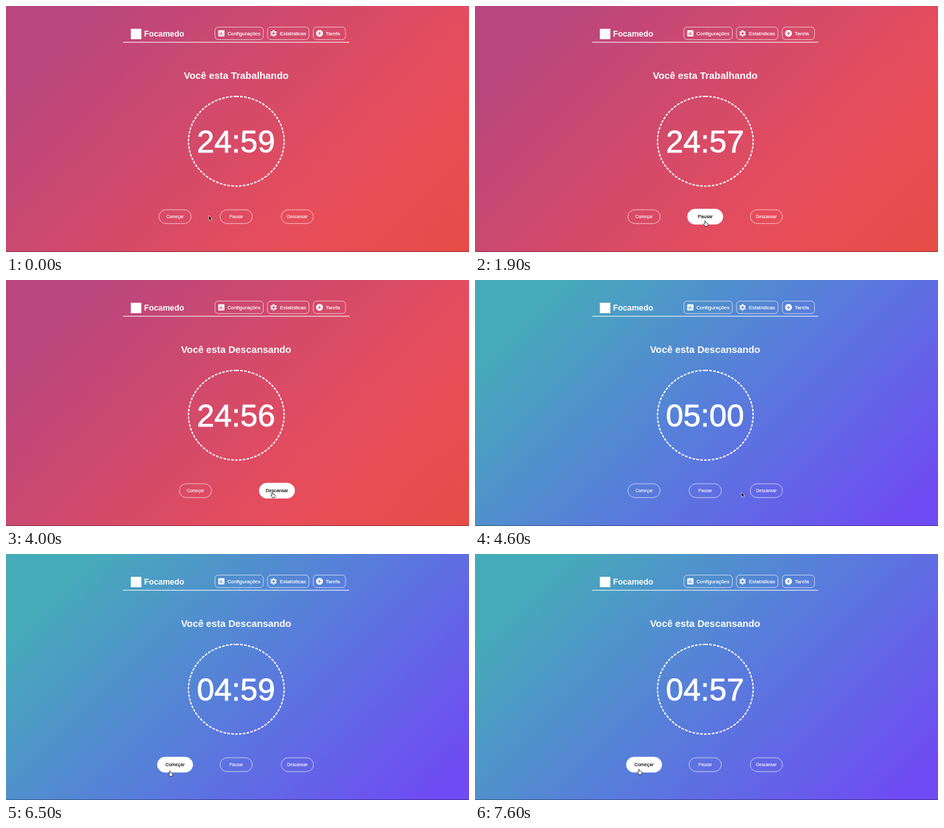
An HTML page that plays this animation: 710 by 378 pixels, repeating every 8 s.

```html
<!DOCTYPE html>
<html lang="pt">
<head>
<meta charset="utf-8">
<title>Focamedo</title>
<style>
  html, body { margin: 0; width: 100%; height: 100%; overflow: hidden; }
  svg { display: block; width: 100vw; height: 100vh; }
  text { font-family: "Liberation Sans", Arial, sans-serif; fill: #fff; }
  .bold { font-weight: bold; }
  .nav text { font-size: 7.89px; stroke: #fff; stroke-width: .18; }
  .outline { fill: none; stroke: #fff; stroke-width: .65; }
  .button text { font-size: 6.57px; text-anchor: middle; stroke: #fff; stroke-width: .12; }
  .hover .outline { fill: #fff; }
  .hover text { fill: #000; stroke: #000; }
  #clock { stroke: #fff; stroke-width: .8; }
</style>
</head>
<body>
<svg viewBox="0 0 710 378">
  <defs>
    <!-- 135deg across the stage -->
    <linearGradient id="work" gradientUnits="userSpaceOnUse" x1="83" y1="-83" x2="627" y2="461">
      <stop offset=".12" stop-color="#b9467e"/>
      <stop offset=".73" stop-color="#e84d5a"/>
      <stop offset="1" stop-color="#e64c46"/>
    </linearGradient>
    <linearGradient id="rest" gradientUnits="userSpaceOnUse" x1="83" y1="-83" x2="627" y2="461">
      <stop offset=".12" stop-color="#46abb9"/>
      <stop offset=".52" stop-color="#587ddb"/>
      <stop offset=".94" stop-color="#6f4bf3"/>
    </linearGradient>
  </defs>
  <rect id="back" width="710" height="378"/>
  <rect y="377" width="710" height="1" opacity=".35"/>

  <rect x="191.5" y="35" width="16" height="16" fill="#fff"/>
  <text class="bold" x="211.7" y="46.8" font-size="12.32">Focamedo</text>
  <rect x="179.5" y="55.2" width="347" height="1" fill="#fff"/>

  <g class="nav">
    <g transform="translate(320.4 32.4)">
      <rect class="outline" width="74.2" height="19.2" rx="5"/>
      <path fill="#fff" fill-rule="evenodd" transform="translate(3.5 3.3) scale(.53)"
        d="M19 3H5a2 2 0 0 0-2 2v14a2 2 0 0 0 2 2h14a2 2 0 0 0 2-2V5a2 2 0 0 0-2-2zM7 10h2v7H7zM11 7h2v10h-2zM15 13h2v4h-2z"/>
      <text x="19" y="12.4">Configurações</text>
    </g>
    <g transform="translate(401 32.4)">
      <rect class="outline" width="63.6" height="19.2" rx="5"/>
      <g transform="translate(9.3 9.7)" fill="none" stroke="#fff" stroke-width="1.9">
        <circle r="2.8"/>
        <circle r="4.2" pathLength="12" stroke-dasharray="1 1" stroke-dashoffset="-.5"/>
      </g>
      <text x="19" y="12.4">Estatísticas</text>
    </g>
    <g transform="translate(471.2 32.4)">
      <rect class="outline" width="49.4" height="19.2" rx="5"/>
      <path fill="#fff" fill-rule="evenodd" transform="translate(3.2 3.3) scale(.53)"
        d="M12 2a10 10 0 0 0 0 20a10 10 0 0 0 0-20zM11 7h2v4h4v2h-4v4h-2v-4H7v-2h4z"/>
      <text x="19" y="12.4">Tarefa</text>
    </g>
  </g>

  <text id="heading" class="bold" x="353" y="112" font-size="14.85" text-anchor="middle"></text>
  <path fill="none" stroke="#fff" stroke-width="2" pathLength="224" stroke-dasharray="2 1"
    d="M353.2 138.9A73.3 68.9 0 0 1 353.2 276.7A73.3 68.9 0 0 1 353.2 138.9"/>
  <text id="clock" x="352.7" y="224.6" font-size="47.9" text-anchor="middle"></text>

  <g id="buttons"></g>

  <path id="arrow" stroke="#fff" stroke-width=".6" stroke-linejoin="round"
    d="M0 0V7.4L1.7 5.9L2.9 8.7L4.2 8.1L3 5.4H5.2Z"/>
  <path id="hand" fill="#fff" stroke="#000" stroke-width=".7" stroke-linejoin="round"
    d="M-.8 .7Q0-.4 .8 .7V3.1Q1.6 2.6 2.1 3.4Q2.9 2.9 3.3 3.8Q4.4 3.5 4.4 4.7Q4.4 6.6 3.5 7.5V8.6H-.3V7.7L-2.3 5.1Q-2.2 4 -.8 5Z"/>
</svg>
<script>
const LOOP = 8000, STEP = 100, PAUSED = 2900, RESTING = 4600;
const CENTER = 353, MIDDLE = 323.7, ROW = 325.6, W = 49.4, H = 21.2;
const $ = id => document.getElementById(id);

// Each move eases out to a point; sag bows the path downwards
const origin = { x: 311, y: 322 };
const moves = [
  { start: 1200, end: 2200, x: 357, y: 325, sag: 19 },
  { start: 3600, end: 4000, x: 408.5, y: 326, sag: 2 },
  { start: 5200, end: 6200, x: 251.5, y: 334, sag: 40 },
  { start: 6400, end: 6900, x: 251, y: 335.2, sag: -1.5 },
  { start: 7100, end: 7600, x: 251.5, y: 330.5, sag: 0 }
];

function pointerAt(t) {
  let { x, y } = origin;
  for (const m of moves) {
    const k = Math.min(1, Math.max(0, (t - m.start) / (m.end - m.start)));
    const eased = 1 - (1 - k) ** 2;
    x += (m.x - x) * eased;
    y += (m.y - y) * eased + m.sag * Math.sin(Math.PI * eased);
    if (k < 1) break;
  }
  return { x, y };
}

function clockAt(t) {
  const left = t < RESTING
    ? 1499 - Math.floor((Math.min(t, PAUSED) + 700) / 1000)
    : 300 - Math.floor((t - RESTING) / 1000);
  const pad = n => String(n).padStart(2, "0");
  return pad(Math.floor(left / 60)) + ":" + pad(left % 60);
}

const buttons = ["Começar", "Pausar", "Descansar"].map(label => {
  const g = document.createElementNS("http://www.w3.org/2000/svg", "g");
  g.innerHTML = `<rect class="outline" x="${-W / 2}" y="${-H / 2}" width="${W}" height="${H}" rx="${H / 2}"/>
    <text y="2.3">${label}</text>`;
  return $("buttons").appendChild(g);
});

// Spaces the visible buttons evenly and returns whether one is under the pointer
function placeButtons(visible, pointer) {
  const n = visible.length;
  const pitch = W + (ROW - n * W) / (n + 1);
  let over = false;
  for (const g of buttons) g.style.display = visible.includes(g) ? "" : "none";
  visible.forEach((g, i) => {
    const cx = CENTER + (i - (n - 1) / 2) * pitch;
    const hover = Math.abs(pointer.x - cx) < W / 2 && Math.abs(pointer.y - MIDDLE) < H / 2 + .4;
    over ||= hover;
    g.setAttribute("class", hover ? "button hover" : "button");
    g.setAttribute("transform", `translate(${cx} ${MIDDLE}) scale(${hover ? 1.1 : 1})`);
  });
  return over;
}

function draw(t) {
  const resting = t >= RESTING, paused = t >= PAUSED && !resting;
  const pointer = pointerAt(t);

  $("back").setAttribute("fill", resting ? "url(#rest)" : "url(#work)");
  $("heading").textContent = "Você esta " + (t < PAUSED ? "Trabalhando" : "Descansando");
  $("clock").textContent = clockAt(t);

  const over = placeButtons(paused ? [buttons[0], buttons[2]] : buttons, pointer);
  for (const [id, shown] of [["arrow", !over], ["hand", over]]) {
    $(id).style.display = shown ? "" : "none";
    $(id).setAttribute("transform", `translate(${pointer.x} ${pointer.y})`);
  }
}

const start = performance.now();
function tick() {
  const t = (performance.now() - start) % LOOP;
  draw(Math.floor(t / STEP) * STEP);
  requestAnimationFrame(tick);
}
tick();
</script>
</body>
</html>
```
